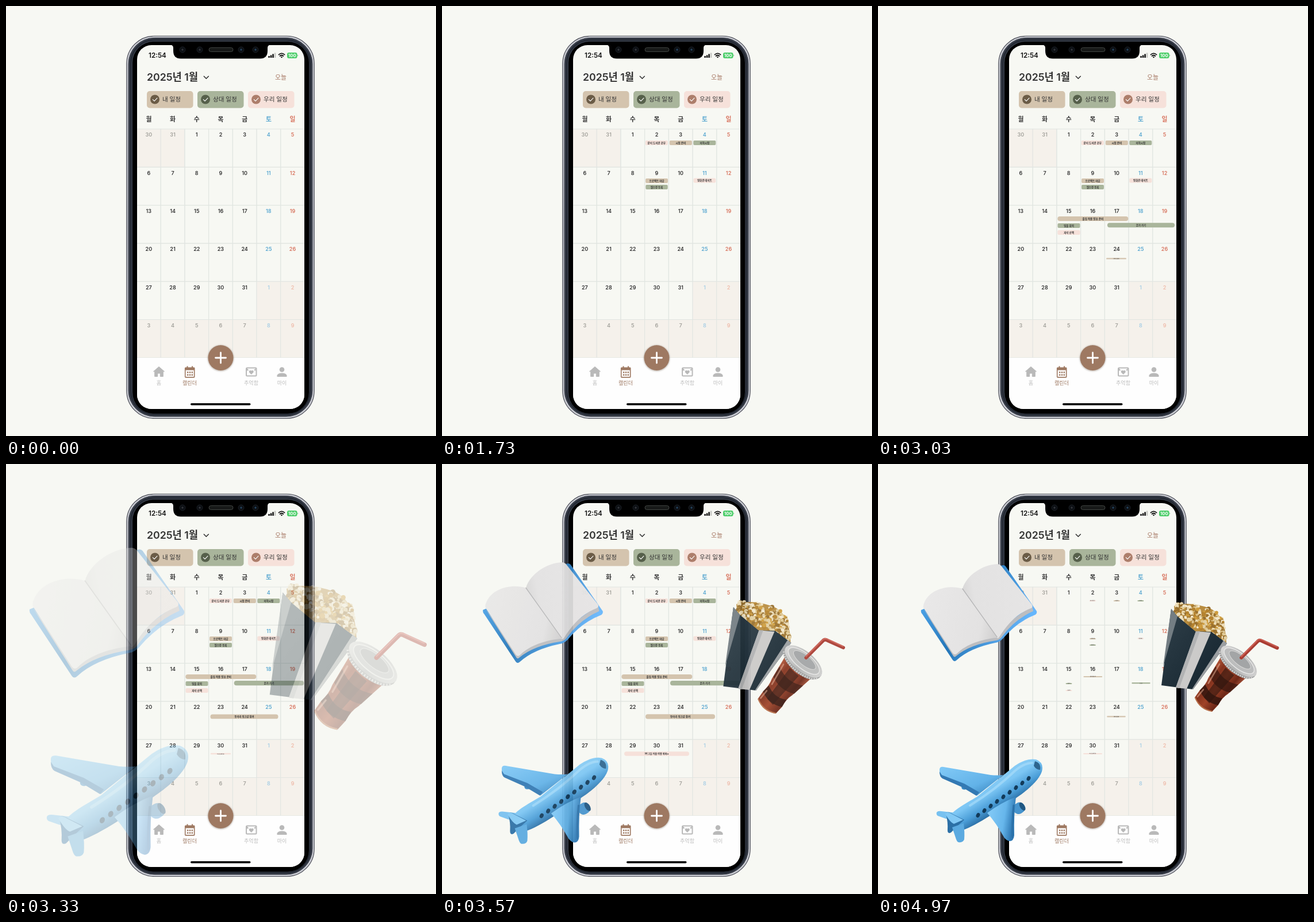
An HTML page for the animation above (5.01 s loop, 748 by 748 pixels).

```html
<!DOCTYPE html>
<html lang="ko">
<head>
<meta charset="utf-8">
<style>
html, body { margin: 0; width: 100%; height: 100%; overflow: hidden; background: #f7f8f3 }
svg { display: block; width: 748px; height: 748px; font-family: Inter, 'Noto Sans CJK KR', 'Noto Sans CJK', sans-serif }
.mid { text-anchor: middle }
.line { fill: none; stroke-linecap: round; stroke-linejoin: round }
</style>
</head>
<body>
<svg viewBox="0 0 748 748">
<defs>
  <linearGradient id="rim" x2="0" y2="1"><stop stop-color="#c9cbd2"/><stop offset=".5" stop-color="#aeb1ba"/><stop offset="1" stop-color="#c9cbd2"/></linearGradient>
  <linearGradient id="pageL" x1="0" y1=".3" x2="1" y2=".5"><stop stop-color="#e9e8e8"/><stop offset=".8" stop-color="#e3e2e2"/><stop offset="1" stop-color="#d2d1d1"/></linearGradient>
  <linearGradient id="pageR" x1="0" y1=".6" x2="1" y2=".4"><stop stop-color="#d6d5d5"/><stop offset=".2" stop-color="#e3e2e2"/><stop offset="1" stop-color="#e6e5e5"/></linearGradient>
  <linearGradient id="cover" x2="1" y2=".4"><stop stop-color="#5cb4fb"/><stop offset=".5" stop-color="#2476b8"/><stop offset="1" stop-color="#66b6fc"/></linearGradient>
  <linearGradient id="body" gradientUnits="userSpaceOnUse" x1="192" y1="556" x2="222" y2="604"><stop stop-color="#86cbf5"/><stop offset=".25" stop-color="#7cc6f4"/><stop offset=".6" stop-color="#4b9ed8"/><stop offset="1" stop-color="#1d5a8e"/></linearGradient>
  <linearGradient id="wing" x2="1" y2="1"><stop stop-color="#82caf7"/><stop offset=".6" stop-color="#62b2e8"/><stop offset="1" stop-color="#2c76b0"/></linearGradient>
  <linearGradient id="lower" x1=".2" x2="1" y2=".2"><stop stop-color="#7fc7f5"/><stop offset=".6" stop-color="#66b6eb"/><stop offset="1" stop-color="#2f79b4"/></linearGradient>
  <linearGradient id="navy" x2="1" y2="1"><stop stop-color="#30404a"/><stop offset="1" stop-color="#12222c"/></linearGradient>
  <linearGradient id="cola"><stop stop-color="#b5583a"/><stop offset=".25" stop-color="#84331e"/><stop offset=".5" stop-color="#a04328"/><stop offset=".8" stop-color="#6d2818"/><stop offset="1" stop-color="#a85238"/></linearGradient>
  <linearGradient id="lid"><stop stop-color="#d8d8d7"/><stop offset=".5" stop-color="#b2b3b3"/><stop offset="1" stop-color="#d0d0cf"/></linearGradient>
  <clipPath id="screen"><rect x="228" y="68" width="291" height="633" rx="25"/></clipPath>
  <filter id="soft" x="-30%" y="-30%" width="160%" height="160%"><feGaussianBlur stdDeviation="1.2"/></filter>
</defs>

<!-- Phone -->
<rect x="209.8" y="52.3" width="326.4" height="665.2" rx="48" fill="url(#rim)" stroke="#464852" stroke-width="1.1"/>
<rect x="213.2" y="55.5" width="319.6" height="658.5" rx="45" fill="#3a404c" stroke="#2a2e38"/>
<rect x="217" y="59" width="312" height="651.5" rx="41" fill="none" stroke="#252a34" stroke-width="3"/>
<rect x="220" y="62" width="307" height="647" rx="37"/>
<g clip-path="url(#screen)">
  <rect x="228" y="68" width="291" height="633" fill="#f7f8f3"/>
  <g id="grid"></g>
  <rect x="228" y="612" width="291" height="90" fill="#fefefe"/>
</g>
<path d="M286 67.5Q291 68 291 73V78Q291 91.5 304 91.5H442Q455 91.5 455 78V73Q455 68 460 67.5Z"/>
<rect x="353" y="72.5" width="42" height="7" rx="3.5" fill="#171918" stroke="#414542"/>
<g id="lenses"></g>

<!-- Status bar -->
<text x="248" y="90" font-size="11.7" font-weight="600" fill="#111">12:54</text>
<path d="M456.3 87h2.5v3h-2.5zM459.8 85.5h2.5v4.500h-2.5zM463.3 83.5h2.5v6.5h-2.5z" fill="#111"/>
<path d="M466.8 81.5h2.5v8.5h-2.5z" fill="#c5c6c2"/>
<g class="line" stroke="#111" stroke-width="1.7"><path d="M474.4 84.6Q479.5 80 484.6 84.6M476.5 87Q479.5 84.5 482.5 87"/><circle cx="479.5" cy="89" r=".5"/></g>
<rect x="489" y="81" width="17.5" height="10" rx="3" fill="#4bcd68"/><path d="M507 84.5q2 1.5 0 3z" fill="#4bcd68"/>
<text class="mid" x="497.8" y="88.8" font-size="7.5" font-weight="700" fill="#fff">100</text>

<!-- Header -->
<text x="245" y="130.3" font-size="17.7" font-weight="600" fill="#333">2025년 1월</text>
<path class="line" d="M344.3 122.3l4 4 4-4" stroke="#333" stroke-width="1.6"/>
<text class="mid" x="478" y="128" font-size="10.8" fill="#a3735e">오늘</text>
<g id="chips"></g>

<!-- Tab bar -->
<g fill="#b9b9b9">
  <path d="M266 627.5l9.5 8.3h-2.2v8.7h-5v-5.5h-4.6v5.5h-5v-8.7h-2.2z" stroke="#b9b9b9" stroke-linejoin="round"/>
  <rect x="418" y="629.5" width="17.5" height="14" rx="1.5" fill="none" stroke="#b9b9b9" stroke-width="2"/>
  <path d="M426.7 641l-3.6-3.6a2.2 2.2 0 0 1 3.6-2.6a2.2 2.2 0 0 1 3.6 2.6zM419 630l3.5 3.5-3.5 1zM434.5 630l-3.5 3.5 3.5 1z"/>
  <circle cx="480" cy="632.5" r="4.3"/><path d="M471.5 645v-2.5q1.5-4 8.5-4t8.5 4v2.5z"/>
</g>
<g fill="#9e7962">
  <path d="M312.5 628.5h2v-2h2v2h6.5v-2h2v2h2q1.500 0 1.500 1.500v15q0 1.8-1.8 1.8h-14q-1.8 0-1.8-1.8v-15q0-1.5 1.6-1.5z"/>
  <path d="M312.5 633.5h14.3v11.5h-14.3z" fill="#fff"/>
  <path d="M315 637.3h10M315 641.8h10" stroke="#9e7962" stroke-width="2.4" stroke-dasharray="2.4 1.4"/>
</g>
<g id="tabs" class="mid" font-size="9"></g>
<rect x="321" y="691" width="104.5" height="3.6" rx="1.8"/>

<g id="pills" class="mid" font-size="4.5" font-weight="600" fill="#333"></g>

<circle cx="373.5" cy="612.5" r="23" fill="#a49a90" opacity=".6" filter="url(#soft)"/>
<circle cx="373.5" cy="612" r="22" fill="#9e7962"/>
<path class="line" d="M364.5 612h18M373.5 603v18" stroke="#fff" stroke-width="2.8"/>

<!-- Book -->
<g class="prop" data-c="175.5 258">
  <path d="M75 254Q74 258 77 261L130 341Q133 345 137 341Q160 320 204 311Q211 310 217 304Q241 275 274 262Q277 260 276 256L222 178Q219 174 212 178L145 226Z" fill="url(#cover)"/>
  <path d="M79 252L131 334Q133 337 136 334Q160 314 205 307Q212 306 216 300Q238 270 270 256L268 246L205 292L133 326Z" fill="#bcbdc0"/>
  <path d="M79 250Q78 246 81 240C92 216 125 210 147 217L208 302C180 305 154 313 137 330Q133 333 130 329Z" fill="url(#pageL)"/>
  <path d="M147 217C154 193 183 175 207 174Q212 174 215 178L268 245Q270 249 266 251C240 261 224 280 211 301Q208 305 206 301Z" fill="url(#pageR)"/>
  <path class="line" d="M147 217L207 301" stroke="#b5b5b6" stroke-width="1.3"/>
</g>

<!-- Plane -->
<g class="prop" data-c="193.5 585.5">
  <ellipse cx="154" cy="559" rx="10" ry="6" fill="#3c8bc6" transform="rotate(-35 154 559)"/>
  <path d="M107 532Q107 526 114 527L196 541Q208 542 218 541L172 577Q162 567 148 559L111 543Q107 541 107 532Z" fill="url(#wing)"/>
  <path d="M107 535L111 541L150 556L176 571L171 577L146 562L112 547Q107 544 107 535Z" fill="#3379b3"/>
  <path d="M102 606Q104 603 110 604L137 607L131 619L118 617L104 612Q101 610 102 606Z" fill="#77c1f0"/>
  <path d="M124 621C119 608 150 592 172 579L238 525Q258 511 275 514Q289 519 285 535C280 550 262 566 243 579C216 598 172 629 147 637Q130 640 124 621Z" fill="url(#body)"/>
  <path class="line" d="M160 594Q205 566 239 533Q255 520 268 520" stroke="#b2e2fc" stroke-width="4" opacity=".55"/>
  <path d="M273 517Q284 520 282 532Q275 532 271 525Z" fill="#2d658f"/>
  <path d="M118 608Q120 604 126 607L150 619L139 629L127 641Q121 644 121 637Q122 623 118 608Z" fill="#2c70a6"/>
  <path d="M117 609Q119 604 125 607L148 619L132 626Q126 624 117 609Z" fill="#82c9f5"/>
  <path d="M129 632L149 625Q151 642 150 653Q148 659 140 658Q137 657 135 650Z" fill="#5baae0"/>
  <g transform="rotate(-32 246 599)"><rect x="235" y="589" width="21" height="19" rx="9" fill="#4794cd"/><ellipse cx="252" cy="599" rx="4" ry="8" fill="#1f5681"/></g>
  <path d="M190 607Q214 589 240 579Q236 610 237 646Q236 656 229 656Q223 655 219 649Q206 625 190 607Z" fill="url(#lower)"/>
  <path class="line" d="M236 594Q233 622 234 649" stroke="#2a70a8" stroke-width="3"/>
  <g id="windows" fill="#123a59"></g>
</g>

<!-- Popcorn and drink -->
<g class="prop" data-c="595 337">
  <path d="M515 247Q540 238 577 251Q604 262 606 311L550 298L516 262Z" fill="#b98d40"/>
  <g id="corn"></g>
  <path d="M510 252L521 265L552 291L580 292L607 312L548 392L493 385Z" fill="url(#navy)"/>
  <path d="M510 252L521 265L496 352Z" fill="#737d83"/>
  <path d="M553 291L579 293L537 391L518 389Z" fill="#cbcac9"/>
  <path d="M553 291L560 291L524 390L518 389Z" fill="#b1b2b3"/>
  <path d="M601 307L607 312L548 392L546 392Z" fill="#9a9ea1"/>
  <g transform="translate(627 344) rotate(39)">
    <path d="M-30 6L-23 55Q-19 66-21 81L-20 96Q0 108 19 96L20 81Q17 66 21 55L29 6Z" fill="url(#cola)"/>
    <path d="M-26 31Q0 45 25 31L22 51Q0 62-23 51Z" fill="#37160f" opacity=".7"/>
    <path d="M-20 67Q0 78 18 67L20 81Q0 92-21 81Z" fill="#2a120d" opacity=".75"/>
    <path d="M-11 22L-8 86L6 88L9 23Z" fill="#2d140e" opacity=".6"/>
    <path class="line" d="M-23 24L-17 62M-17 76V92" stroke="#f1b79b" stroke-width="2.5" opacity=".5"/>
    <path class="line" d="M-19 96Q0 106 18 96" stroke="#b8704a" stroke-width="2"/>
    <path d="M-38-2V4Q-32 20 0 21Q32 20 38 4V-2Z" fill="#9fa0a0"/>
    <ellipse cy="-1" rx="38" ry="17" fill="url(#lid)"/>
    <ellipse cy="-2" rx="32" ry="13" fill="#bcbdbd" stroke="#e6e6e5" stroke-width="1.5"/>
    <ellipse cy="-4" rx="23" ry="8.5" fill="#a3a5a6" stroke="#d6d6d5"/>
    <path d="M-36 7Q-27 18 0 19Q27 18 36 7" fill="none" stroke="#e2e1e0" stroke-width="3" stroke-dasharray="1.5 2.5"/>
  </g>
  <path class="line" d="M632 337L660 309Q663 305 668 308L694.5 320" stroke="#a93c32" stroke-width="5.8"/>
  <path class="line" d="M632 335L660 307Q663 304 668 306L694 318" stroke="#cf6154" stroke-width="1.8"/>
</g>
</svg>
<script>
const $ = id => document.getElementById(id);
const fill = (id, list, make) => $(id).innerHTML = list.map(make).join('');
const upTo = n => [...Array(n).keys()];
const TAN = '#d4c4ae', GREEN = '#a9b59b', PINK = '#f6e1da';
const LOOP = 5010, STAGGER = 300, EXIT = 4470, PROPS = 3200;

// Calendar
const COL = 41.7, ROW = 66.3, LEFT = 227.5, TOP = 214;
const ink = (c, out) => out ? ['#a3a29c', '#a9cfe5', '#efbcab'][Math.max(0, c - 4)]
                            : ['#333', '#5aa8d1', '#d87560'][Math.max(0, c - 4)];
const label = (x, y, size, color, s) =>
  `<text class="mid" x="${x}" y="${y}" font-size="${size}" font-weight="600" fill="${color}">${s}</text>`;
const mid = c => LEFT + COL * (c + .5);

fill('grid', upTo(42), i => {
  const c = i % 7, r = i / 7 | 0, day = i - 1, out = day < 1 || day > 31;
  const date = day < 1 ? day + 31 : day > 31 ? day - 31 : day;
  return `<rect x="${LEFT + c * COL}" y="${TOP + r * ROW}" width="${COL}" height="${ROW}" fill="${out ? '#f5f1eb' : 'none'}" stroke="#e1e5e1"/>`
    + label(mid(c), 227.4 + r * ROW, 9, ink(c, out), date);
});
$('grid').innerHTML += [...'월화수목금토일'].map((s, c) => label(mid(c), 200.5, 10.8, ink(c), s)).join('');

fill('lenses', [[307, '#33363c'], [337, '#33363c'], [409, '#24435f'], [434, '#24435f']], ([x, color]) =>
  `<circle cx="${x}" cy="76" r="5" fill="#0c0f13" stroke="#1b2026"/><circle cx="${x}" cy="76" r="1.7" fill="${color}"/>`);

fill('chips', [['내 일정', TAN, '#6b5c47'], ['상대 일정', GREEN, '#56604b'], ['우리 일정', PINK, '#ad7e6b']], ([s, bg, dot], i) =>
  `<g transform="translate(${245 + 88 * i} 148)"><rect width="80.5" height="29.5" rx="5" fill="${bg}"/>
  <circle cx="14" cy="14.5" r="8" fill="${dot}"/><path class="line" d="M10.3 14.7l2.7 2.7 5-5.3" stroke="#fff" stroke-width="1.1"/>
  <text x="27" y="18.3" font-size="10.6" font-weight="500" fill="#333">${s}</text></g>`);

fill('tabs', [[266, '홈'], [319.5, '캘린더'], [426.5, '추억함'], [480, '마이']], ([x, s], i) =>
  `<text x="${x}" y="658.5" fill="${i == 1 ? '#9e7962' : '#bcbcbc'}">${s}</text>`);

// Events, in order of appearance
const events = [
  [373.2, 238, 39, PINK, '같이 도서관 공부'],
  [415.3, 238, 39, TAN, '시험 준비'],
  [456.8, 238, 39, GREEN, '어학시험'],
  [373.5, 304, 39, TAN, '프로젝트 마감'],
  [373.5, 315, 39, GREEN, '헬스장 등록'],
  [456.8, 303.5, 39, PINK, '영화관 데이트'],
  [373.8, 370, 123, TAN, '졸업 작품 발표 준비'],
  [332, 382, 39, GREEN, '팀플 회의'],
  [332, 394, 39, PINK, '저녁 산책'],
  [457.5, 381.2, 121, GREEN, '본가 가기'],
  [414.5, 439.4, 122, TAN, '동아리 워크샵 참여'],
  [373.5, 504, 123, PINK, '1박 2일 겨울 여행 계획✈']
];
fill('pills', events, ([, , w, color, s]) =>
  `<g><rect x="${-w / 2}" y="-4.1" width="${w}" height="8.2" rx="${w > 40 ? 4.1 : 2}" fill="${color}"/><text y="1.7">${s}</text></g>`);

// Plane windows
fill('windows', upTo(9), i => {
  const x = 174 + i * 11, y = 611 - i * 8;
  return `<ellipse cx="${x}" cy="${y}" rx="3.2" ry="4.2" transform="rotate(25 ${x} ${y})"/>`;
});

// Popcorn heap: seeded clusters between the crest and the box edge
let seed = 7;
const rnd = () => (seed = seed * 16807 % 2147483647) / 2147483647;
const tones = ['#ecdcb6', '#dfc78f', '#cf9d3e', '#f3e8cd', '#b5832f', '#e3d0a2'];
fill('corn', upTo(150), i => {
  const u = rnd(), v = i / 150;
  const x = 518 + 85 * u, crest = 244 + 32 * u ** 3, floor = 266 + 44 * u;
  const y = crest + (floor - crest) * v;
  return upTo(3).map(k => `<circle cx="${x + rnd() * 7 - 3.5}" cy="${y + rnd() * 7 - 3.5}" r="${1.6 + rnd() * 2.2}" fill="${k ? tones[rnd() * 6 | 0] : '#98702f'}"/>`).join('');
});

// Fast rise, then a damped bounce around full size
function pop(ms) {
  const t = ms / 1000, d = t - .165;
  return t <= 0 ? 0 : t < .105 ? 9.2 * t : 1 + .2 * Math.exp(-7.2 * d) * Math.cos(25 * d);
}

const pills = [...$('pills').children], props = document.querySelectorAll('.prop');
function draw() {
  const t = performance.now() % LOOP;
  pills.forEach((g, i) => {
    const [x, y] = events[i];
    const s = pop(t < EXIT ? t - STAGGER * i : 5000 - t);
    g.setAttribute('transform', `translate(${x} ${y}) scale(${s})`);
    g.style.display = s ? '' : 'none';
  });
  const p = Math.min(1, Math.max(0, (t - PROPS) / 400)), size = 1.5 - p / 2;
  props.forEach(g => {
    const [x, y] = g.dataset.c.split(' ');
    g.setAttribute('transform', `translate(${x} ${y}) scale(${size}) translate(${-x} ${-y})`);
    g.style.opacity = p;
  });
  requestAnimationFrame(draw);
}
draw();
</script>
</body>
</html>
```
